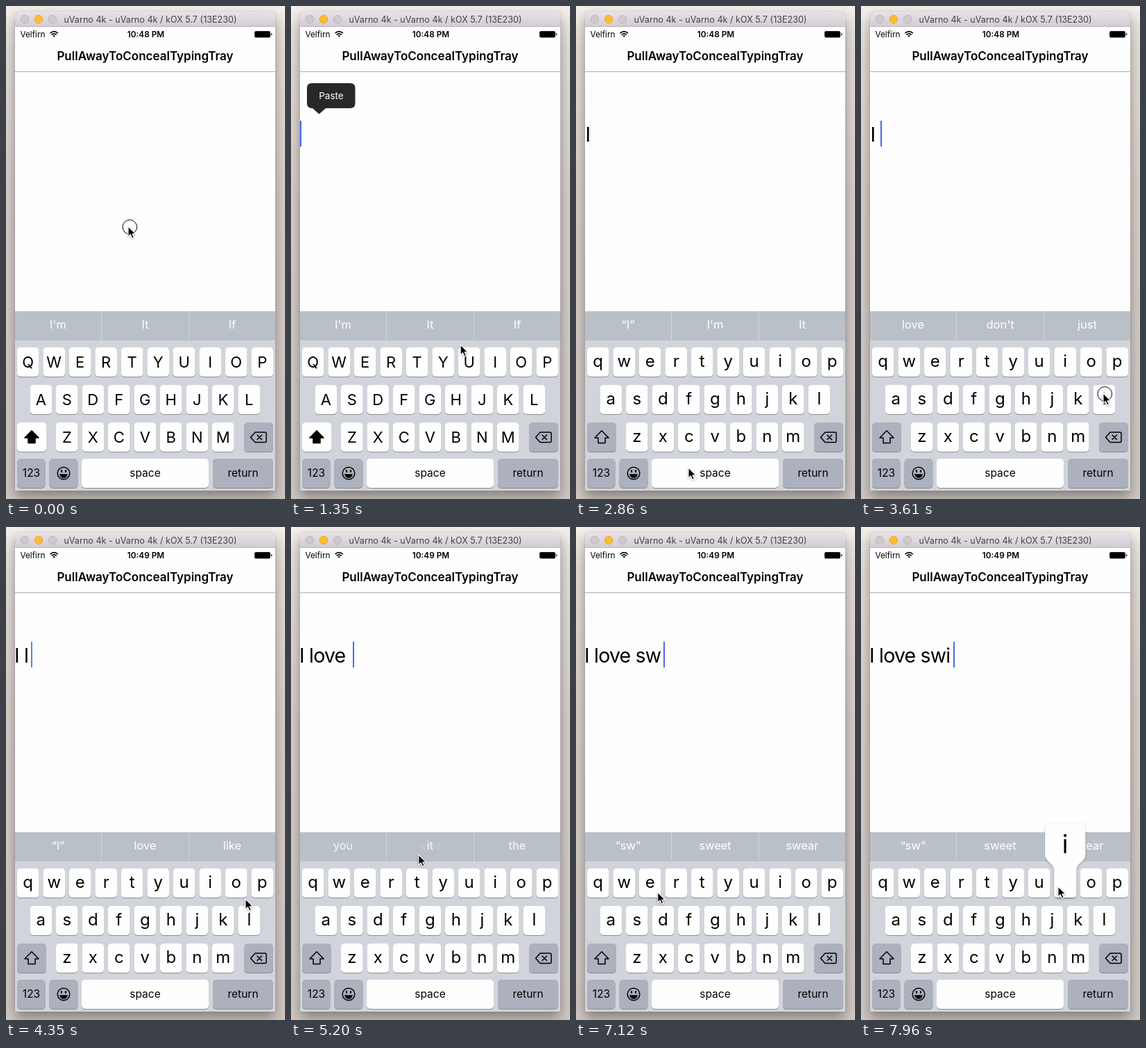
These frames come from a looping animation (402 by 709 pixels, 8 s). An HTML page:

```html
<!DOCTYPE html>
<html lang="en">
<head>
<meta charset="utf-8">
<title>Keyboard demo</title>
<style>
html, body { margin: 0; width: 100%; height: 100%; overflow: hidden; }
body { position: relative; background: linear-gradient(#f4efea 0, #e4ddd8 60px, #d6cec9 280px, #d0c8c3 100%); }
#shade { position: absolute; left: 13px; top: 8px; width: 375px; height: 689px; border-radius: 5px 5px 0 0;
  box-shadow: 0 9px 18px rgba(0,0,0,.36), 0 0 1px rgba(0,0,0,.5); }
svg { position: absolute; left: 0; top: 0; display: block; }
text { font-family: Inter, Roboto, sans-serif; text-anchor: middle; white-space: pre; }
.key { fill: #fefefe; }
.dark { fill: #acb1bd; }
.upper { font-size: 22px; }
.lower { font-size: 24px; }
.label { font-size: 15.5px; }
.hint { font-size: 16.5px; fill: #fff; }
.line { fill: none; stroke: #000; stroke-width: 1.5; stroke-linejoin: round; stroke-linecap: round; }
</style>
</head>
<body>
<div id="shade"></div>
<svg width="402" height="709" viewBox="0 0 402 709">
  <defs>
    <linearGradient id="bar" x2="0" y2="1"><stop stop-color="#e9e2e8"/><stop offset="1" stop-color="#d2ccd2"/></linearGradient>
    <filter id="soft" x="-30%" y="-30%" width="160%" height="160%"><feDropShadow dx="0" dy="1" stdDeviation="1.5" flood-opacity=".35"/></filter>
  </defs>
  <path d="M13 30V13q0-5 5-5H383q5 0 5 5V30Z" fill="url(#bar)"/>
  <path d="M13 29.5H388" stroke="#b9b3b8"/>
  <g stroke-width=".8">
    <circle cx="27" cy="19" r="5.8" fill="#cfc9ce" stroke="#b6b0b5"/>
    <circle cx="47" cy="19" r="5.8" fill="#fdbc2f" stroke="#dfa023"/>
    <circle cx="67" cy="19" r="5.8" fill="#cfc9ce" stroke="#b6b0b5"/>
  </g>
  <text x="208" y="24" font-size="12.6" fill="#454146">uVarno 4k - uVarno 4k / kOX 5.7 (13E230)</text>

  <path d="M13 30H388V439H13Z" fill="#fefefe"/>
  <path d="M13 94.5H388" stroke="#adadad"/>
  <text x="38.5" y="45" font-size="11.8">Velfirn</text>
  <g class="line" style="stroke-width:1.7;stroke-linecap:butt">
    <path d="M63.6 39.2q5.6-5 11.2 0M65.6 41.4q3.6-3.2 7.2 0"/>
    <path d="M67.4 42.6L69.2 45 71 42.6Q69.2 41.6 67.4 42.6Z" fill="#000" stroke="none"/>
  </g>
  <text id="clock" x="201.5" y="45" font-size="11.8" font-weight="600"></text>
  <rect x="358.5" y="36.5" width="22" height="8.5" rx="1.5" stroke="#000" stroke-width=".8"/>
  <path d="M382 39v3.5q1.5-.5 1.5-1.75T382 39"/>
  <text x="200.5" y="78" font-size="17" font-weight="600">PullAwayToConcealTypingTray</text>

  <text id="typed" y="195" font-size="28.5" letter-spacing="-.8" style="text-anchor:start"></text>
  <rect id="caret" y="165" width="2" height="37" fill="#426bf2"/>
  <g id="paste">
    <path d="M30 111H85.500q7 0 7 7V140q0 7-7 7H50L40.500 155.500 31 147H30q-7 0-7-7V118q0-7 7-7Z" fill="#282828"/>
    <text x="58" y="134" font-size="13.5" fill="#fff">Paste</text>
  </g>

  <path d="M13 439H388V481H13Z" fill="#bac0c8"/>
  <path d="M137.500 439V481M263.500 439V481" stroke="#d1d5db"/>
  <g id="oldHints"></g>
  <g id="newHints"></g>

  <path d="M13 481H388V697H13Z" fill="#d1d5db"/>
  <g id="keys"></g>
  <path id="arrow" class="line" d="M37 610.800L47 621H42V628.500H32V621H27Z"/>
  <g class="line">
    <path d="M359 613H373q2 0 2 2V625.500q0 2-2 2H359L352.500 620.200Z"/>
    <path d="M362 617l6.500 6.500M368.500 617l-6.500 6.500"/>
    <circle cx="83" cy="672" r="8.800"/>
    <path d="M77.500 673.500H88.500Q87.500 678.500 83 678.500T77.500 673.500Z" fill="#000" stroke-width=".6"/>
    <path d="M80 668v1.800M86 668v1.800" stroke-width="2.200"/>
  </g>
  <g id="popup">
    <path d="M-29-56q0-9 9-9H20q9 0 9 9V-20C29-8 16-10 16 4V37q0 5-5 5H-11q-5 0-5-5V4C-16-10-29-8-29-20Z" fill="#fefefe" filter="url(#soft)"/>
    <text id="popupLetter" y="-22" font-size="36"></text>
  </g>
  <circle id="touch" r="10.300" fill="#fff" fill-opacity=".8" stroke="#000" stroke-width="1"/>
  <path id="pointer" d="M0 0V14.700L3.400 11.600 5.700 17 8.200 15.900 6 10.700H10.600Z" stroke="#fff" stroke-width="1.100" filter="url(#soft)"/>
</svg>
<script>
const LOOP = 8000;
const $ = id => document.getElementById(id);
const NS = 'http://www.w3.org/2000/svg';

function add(parent, tag, attrs, content = '') {
  const node = document.createElementNS(NS, tag);
  for (const name in attrs) node.setAttribute(name, attrs[name]);
  node.textContent = content;
  parent.append(node);
  return node;
}

// Keyboard
const keys = $('keys'), letters = [], home = {};

function addKey(x, y, width, style) {
  add(keys, 'rect', { x, y: y + 1, width, height: 42, rx: 5, fill: '#898c92' });
  return add(keys, 'rect', { x, y, width, height: 42, rx: 5, class: style });
}

['qwertyuiop', 'asdfghjkl', 'zxcvbnm'].forEach((row, r) => {
  const y = 491 + 54 * r, first = [31.7, 50.3, 87.8][r];
  [...row].forEach((char, i) => {
    const x = first + 37.5 * i;
    addKey(x - 15.8, y, 31.6, 'key');
    home[char] = { x, y };
    letters.push({ char, y, node: add(keys, 'text', { x }) });
  });
});

const shiftKey = addKey(16, 599, 42, 'key');
addKey(343, 599, 42, 'dark');
addKey(16, 651, 40.5, 'dark');
addKey(62.5, 651, 41, 'dark');
const spaceKey = addKey(109, 651, 183, 'key');
addKey(298, 651, 87, 'dark');
[[36.5, '123'], [200.5, 'space'], [341.5, 'return']].forEach(([x, label]) =>
  add(keys, 'text', { x, y: 677, class: 'label' }, label));

const hintGroups = ['oldHints', 'newHints'].map($);
hintGroups.forEach(group => [75, 200.5, 326].forEach(x => add(group, 'text', { x, y: 464, class: 'hint' })));

// Timeline
const edits = [
  { at: -730, text: '', caret: 13 },
  { at: 300, text: '', caret: 13 },
  { at: 2150, text: 'I', caret: 20 },
  { at: 3120, text: 'I ', caret: 28 },
  { at: 3820, text: 'I l', caret: 36 },
  { at: 5080, text: 'I love ', caret: 89 },
  { at: 6300, text: 'I love s', caret: 104 },
  { at: 6880, text: 'I love sw', caret: 126 },
  { at: 7880, text: 'I love swi', caret: 133 }
].filter(edit => edit.at !== 300);

const hints = [
  { at: -200, words: ["I'm", 'It', 'If'] },
  { at: 2180, words: ['“I”', "I'm", 'It'] },
  { at: 3150, words: ['love', "don't", 'just'] },
  { at: 3860, words: ['“l”', 'love', 'like'] },
  { at: 5100, words: ['you', 'it', 'the'] },
  { at: 6360, words: ['“s”', 'seeing', 'the'] },
  { at: 6930, words: ['“sw”', 'sweet', 'swear'] }
];

const popups = [
  { from: 1900, to: 2230, char: 'i', shown: 'I' },
  { from: 3650, to: 3920, char: 'l' },
  { from: 6180, to: 6370, char: 's' },
  { from: 6720, to: 6960, char: 'w' },
  { from: 7800, to: 8000, char: 'i' }
];

const touches = [[0, 60], [1840, 2130], [2960, 3110], [3510, 3800], [4960, 5070],
  [6130, 6280], [6660, 6860], [7750, 7870]];

// time, x, y of the pointer tip
const path = [
  [0, 176, 317], [850, 176, 317], [1350, 244, 487], [1590, 296, 519], [2280, 296, 519],
  [2600, 215, 617], [2860, 162, 664], [3130, 162, 664], [3500, 349, 557], [3850, 349, 557],
  [4200, 345, 535], [4370, 345, 535], [4880, 192, 456], [5130, 190, 460], [5200, 184, 471],
  [5580, 85, 657], [5960, 72, 598], [6130, 86, 562], [6300, 86, 562], [6420, 80, 519],
  [6620, 68, 516], [6960, 68, 516], [7250, 180, 532], [7580, 310, 522], [7740, 284, 517], [8000, 284, 517]
];

const clamp = v => Math.min(1, Math.max(0, v));
const latest = (list, t) => list.findLastIndex(item => item.at <= t);
const show = (node, visible) => { node.style.display = visible ? '' : 'none'; };
const move = (node, x, y) => node.setAttribute('transform', `translate(${x} ${y})`);

// Monotone cubic interpolation: smooth through bends, still at rests.
function slope(i, k) {
  const rate = j => path[j] && path[j + 1] ? (path[j + 1][k] - path[j][k]) / (path[j + 1][0] - path[j][0]) : 0;
  const a = rate(i - 1), b = rate(i);
  return a * b > 0 ? 2 * a * b / (a + b) : 0;
}

function pointerAt(t) {
  const i = Math.max(0, path.findIndex(p => p[0] > t) - 1);
  const a = path[i], b = path[i + 1], span = b[0] - a[0], u = (t - a[0]) / span;
  return [1, 2].map(k =>
    a[k] + (b[k] - a[k]) * u * u * (3 - 2 * u) +
    span * u * (1 - u) * (slope(i, k) * (1 - u) - slope(i + 1, k) * u));
}

function caretOpacity(age) {
  const phase = age % 1030;
  return phase < 880 ? 1 - clamp((phase - 500) / 230) : clamp((phase - 900) / 130);
}

let lastCase;
function setCase(upper) {
  if (upper === lastCase) return;
  lastCase = upper;
  for (const { char, y, node } of letters) {
    node.textContent = upper ? char.toUpperCase() : char;
    node.setAttribute('class', upper ? 'upper' : 'lower');
    node.setAttribute('y', y + (upper ? 29 : 27.5));
  }
  shiftKey.setAttribute('class', upper ? 'key' : 'dark');
  $('arrow').style.fill = upper ? '#000' : 'none';
}

function draw(t) {
  setCase(t < 2180);
  $('clock').textContent = t < 3900 ? '10:48 PM' : '10:49 PM';

  const edit = edits[latest(edits, t)];
  $('typed').textContent = edit.text;
  $('typed').setAttribute('x', edit.text.length < 3 ? 13.5 : 12);
  $('caret').setAttribute('x', edit.caret);
  $('caret').setAttribute('opacity', caretOpacity(t - edit.at));
  $('paste').setAttribute('opacity', clamp((t - 180) / 250) * clamp((2250 - t) / 120));

  const h = latest(hints, t), fade = clamp((t - hints[h].at) / 120);
  [hints[Math.max(0, h - 1)], hints[h]].forEach((set, g) => {
    [...hintGroups[g].children].forEach((node, i) => { node.textContent = set.words[i]; });
    hintGroups[g].setAttribute('opacity', g ? fade : 1 - fade);
  });

  const popup = popups.find(p => t >= p.from && t < p.to);
  show($('popup'), popup);
  if (popup) {
    move($('popup'), home[popup.char].x, home[popup.char].y);
    $('popupLetter').textContent = popup.shown || popup.char;
  }
  spaceKey.setAttribute('class', t >= 2980 && t < 3130 ? 'dark' : 'key');

  const [x, y] = pointerAt(t);
  move($('pointer'), x, y);
  move($('touch'), x + 2.3, y + .8);
  show($('touch'), touches.some(([from, to]) => t >= from && t < to));
}

const start = performance.now();
function tick() {
  draw((performance.now() - start) % LOOP);
  requestAnimationFrame(tick);
}
tick();
</script>
</body>
</html>
```
